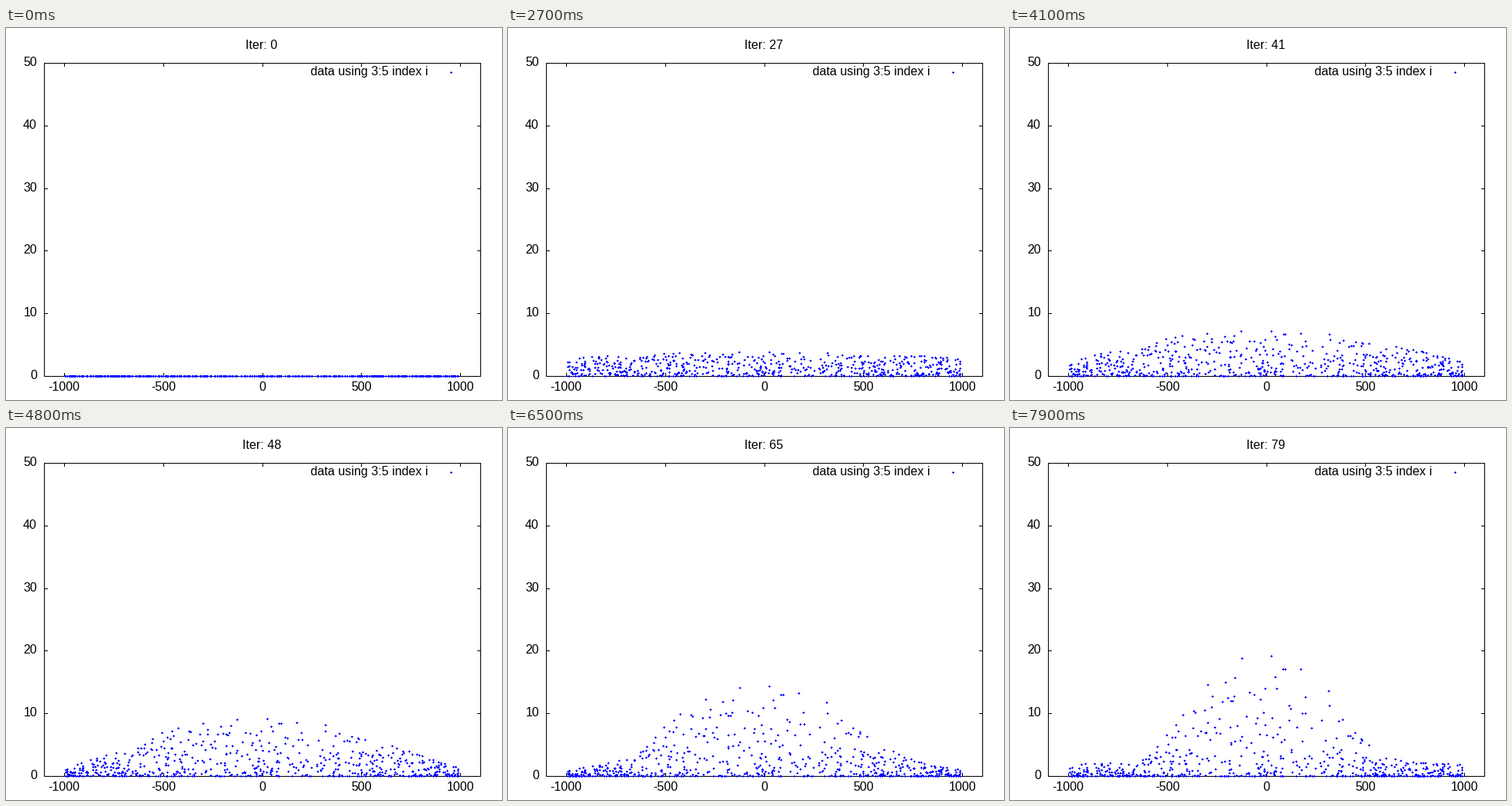
These frames come from a looping animation (640 px wide and 480 px high, 8000 ms). A matplotlib script:

```python
import numpy as np
import matplotlib.pyplot as plt
from matplotlib.animation import FuncAnimation
from matplotlib.path import Path

W, H, DPI = 640, 480, 100
PX = 72 / DPI
FRAMES, STEP = 80, 100
LEFT, RIGHT, TOP, BOTTOM = 49, 612, 45, 449
N = 660

plt.rcParams["font.family"] = "Liberation Sans"
plt.rcParams["font.size"] = 16 * PX


def sx(x):
    return LEFT + (x + 1100) * (RIGHT - LEFT) / 2200


def sy(y):
    return BOTTOM - y * (BOTTOM - TOP) / 50


def pixel(v):
    return np.floor(v + 0.5)


rng = np.random.default_rng(12)
x0 = rng.uniform(-996, 996, N)
rank = rng.uniform(0, 1, N)


def cloud(t):
    """A hump that rises and narrows, with low ripples outside it."""
    s = t / (FRAMES - 1)
    width = 1752 * np.exp(-0.0168 * t)
    hump = np.exp(-np.abs(x0 / width) ** 3)
    ripple = 2.8 * np.tanh(t / 8) * abs(np.cos(np.pi * t / 104))
    bound = 19.3 * s ** 1.5 * hump + ripple * (1 - hump)
    y = bound * rank ** (1 + 2 * s)
    x = x0 * (1 - 0.02 * s ** 2 * np.exp(-(x0 / 600) ** 2))
    return x, y


fig = plt.figure(figsize=(W / DPI, H / DPI), dpi=DPI, facecolor="white")
ax = fig.add_axes([0, 0, 1, 1])
ax.set_xlim(0, W)
ax.set_ylim(H, 0)
ax.axis("off")


def line(xs, ys):
    ax.plot(np.array(xs) + 0.5, np.array(ys) + 0.5, color="black", lw=PX,
            snap=False, solid_capstyle="projecting",
            solid_joinstyle="miter", zorder=2)


def label(x, y, s, ha):
    return ax.text(x, y, s, ha=ha, va="baseline", color="black")


line([LEFT, RIGHT, RIGHT, LEFT, LEFT], [TOP, TOP, BOTTOM, BOTTOM, TOP])
for v in range(-1000, 1001, 500):
    p = pixel(sx(v))
    line([p, p], [BOTTOM, BOTTOM - 4])
    line([p, p], [TOP, TOP + 4])
    label(sx(v) + 0.5, 468, str(v), "center")
for v in range(0, 51, 10):
    p = pixel(sy(v))
    line([LEFT, LEFT + 4], [p, p])
    line([RIGHT, RIGHT - 4], [p, p])
    label(40, p + 4, str(v), "right")

# Three-pixel plus sign aligned to the pixel grid
plus = Path([(0, -2), (1, -2), (1, -1), (2, -1), (2, 0), (1, 0), (1, 1),
             (0, 1), (0, 0), (-1, 0), (-1, -1), (0, -1), (0, -2)], closed=True)
style = dict(ls="none", marker=plus, ms=4 * PX, mec="none", mew=0,
             mfc="#0000ff", zorder=3)

label(544.5, 61, "data using 3:5 index i", "right")
ax.plot([574], [57], **style)
dots, = ax.plot([], [], **style)
title = label(330, 27, "", "center")


def draw(t):
    x, y = cloud(t)
    dots.set_data(pixel(sx(x)), pixel(sy(y)))
    title.set_text(f"Iter: {t}")
    return dots, title


anim = FuncAnimation(fig, draw, frames=FRAMES, interval=STEP,
                     repeat=True, repeat_delay=0, blit=False)
plt.show()
```
